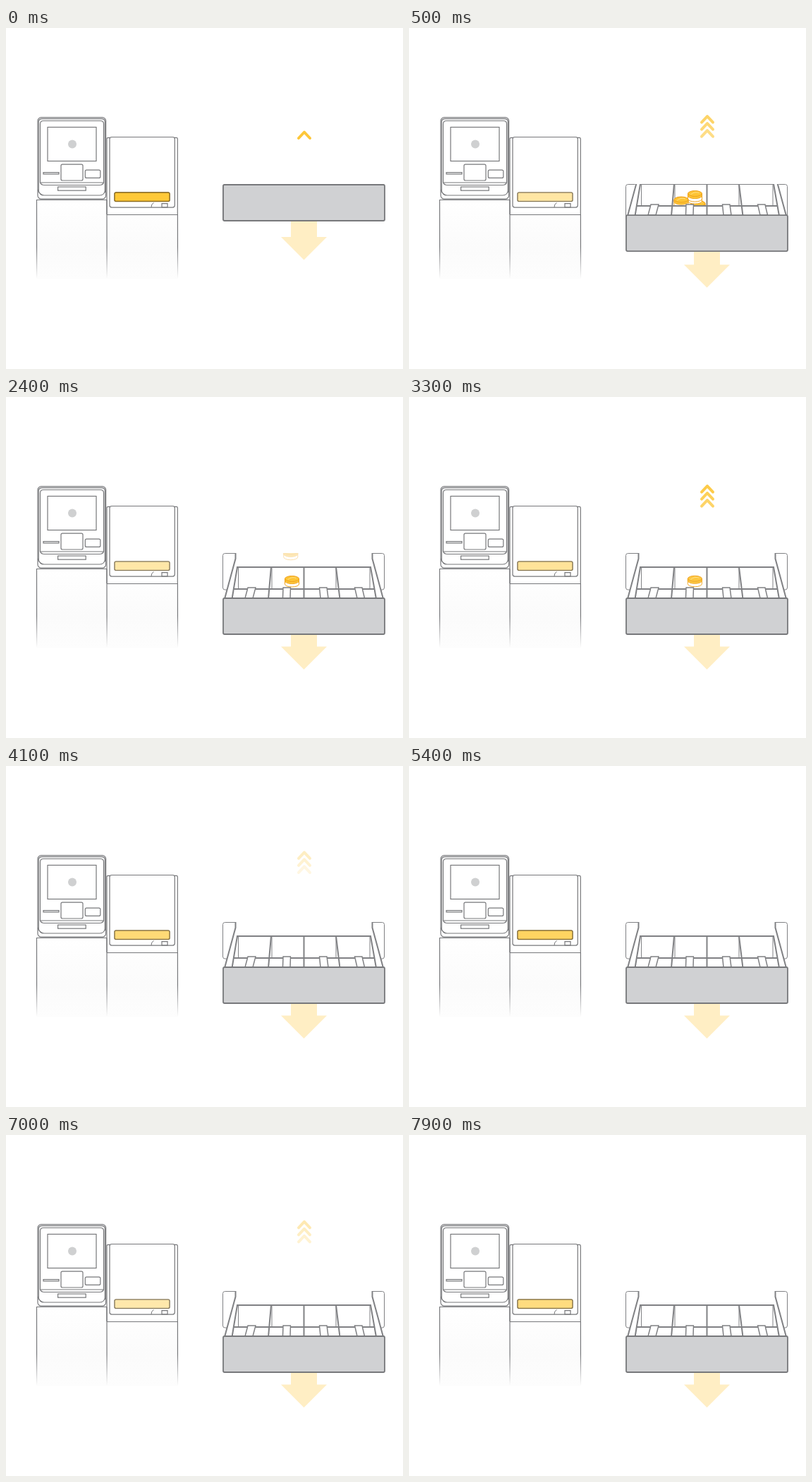
These frames come from a looping animation (563 px wide and 483 px high, 8000 ms). An HTML page:

```html
<!DOCTYPE html>
<html lang="en">
<head>
<meta charset="utf-8">
<title>Emptying the coin tray</title>
<style>
  html, body { margin: 0; width: 100%; height: 100%; overflow: hidden; background: #fff; }
  svg { display: block; width: 563px; height: 483px; }
  .line { fill: none; stroke: #77787b; stroke-width: 1.2; }
  .thick { fill: none; stroke: #808184; stroke-width: 2; }
  .thin { fill: none; stroke: #808184; stroke-width: 1; }
  .white { fill: #fff; }
  .chevron { fill: none; stroke: #fdc73a; stroke-width: 4; stroke-linecap: round; stroke-linejoin: round; }
</style>
</head>
<body>
<svg viewBox="0 0 563 483">
  <defs>
    <linearGradient id="fadeLine" gradientUnits="userSpaceOnUse" x1="0" y1="243" x2="0" y2="355">
      <stop offset="0" stop-color="#77787b"/>
      <stop offset=".6" stop-color="#77787b"/>
      <stop offset="1" stop-color="#77787b" stop-opacity="0"/>
    </linearGradient>
    <linearGradient id="fadeFill" x1="0" y1="0" x2="0" y2="1">
      <stop offset="0" stop-color="#fff"/>
      <stop offset=".6" stop-color="#fbfbfb"/>
      <stop offset="1" stop-color="#fdfdfd"/>
    </linearGradient>
    <clipPath id="opening"><rect x="300" y="221" width="245" height="130"/></clipPath>
    <clipPath id="bin"><rect x="374" y="150" width="48" height="121"/></clipPath>
    <g id="coin">
      <path d="M-10 0V7.5A10 4 0 0 0 10 7.5V0Z" fill="#fff" stroke="#f0a41c"/>
      <path d="M-10 1V3A10 4 0 0 0 10 3V1" fill="#fdc73a" stroke="#f0a41c"/>
      <ellipse rx="10" ry="4" fill="#fdc435" stroke="#ee9f1b"/>
      <path d="M-6 1.2Q0 -3.5 6 -1" fill="none" stroke="#ffdf86"/>
    </g>
  </defs>

  <!-- cabinets -->
  <rect x="43.5" y="243.5" width="200" height="112" fill="url(#fadeFill)"/>
  <rect x="144" y="244" width="100" height="20" class="white"/>
  <g fill="none" stroke="url(#fadeLine)" stroke-width="1.2">
    <path d="M43.5 243.5L43.6 355M143 243.5L143.1 355M243.4 264.5L243.5 355"/>
  </g>
  <path class="line" d="M43 243.5H143M143 264.5H244"/>

  <!-- terminal -->
  <g class="line">
    <rect x="45" y="126.6" width="96.6" height="115.6" rx="5"/>
    <path d="M46.3 233V133Q46.3 128.6 51 128.6H135.600Q140.300 128.600 140.300 133V233"/>
    <path d="M48.500 219V136Q48.500 131.500 53 131.500H134Q138.500 131.500 138.500 136V219Q137 222.500 133 222.500H54Q50 222.500 48.500 219ZM48.500 219H138.500"/>
    <path d="M45.500 229Q47.500 237 54 237H133Q139.500 237 141.200 229"/>
    <rect x="59" y="140.500" width="69" height="48"/>
    <rect x="53" y="204.600" width="22" height="2.300"/>
    <rect x="78" y="193.200" width="31" height="22.800" rx="2"/>
    <rect x="112.300" y="201.200" width="21.500" height="11.200" rx="2"/>
    <rect x="73.600" y="225" width="39.600" height="5.200"/>
  </g>
  <circle cx="94" cy="164.500" r="6" fill="#cfd0d1"/>

  <!-- coin unit -->
  <g class="line">
    <path d="M143 264V157Q143 155.300 145 155.300H241.500Q243.300 155.300 243.300 157V264"/>
    <rect x="147" y="154.500" width="92.300" height="99.600" rx="3" class="white" style="fill:#fff"/>
    <path d="M206 254Q206 249 209.500 247.500" stroke-width="1"/>
    <path d="M221 254V248.700H229V254Z"/>
    <rect x="154" y="233" width="78" height="12.500" rx="2"/>
  </g>
  <rect id="glow" x="154" y="233" width="78" height="12.500" rx="2" fill="#ffc938" stroke="#8a6a1c" stroke-width="1.300"/>

  <!-- drawer -->
  <rect class="thin" x="307.500" y="221.500" width="229" height="51.500" rx="3"/>
  <path id="arrow" d="M404 325H441V353.500H455L422.500 386L390 353.500H404Z" fill="#ffeec4"/>
  <g clip-path="url(#opening)">
    <g id="tray">
      <path class="white" d="M325.500 221L310 286H535L519.500 221Z"/>
      <path class="thin" d="M329.500 241V272M377 241V272M468 241V272M516 241V272"/>
      <g id="coins" clip-path="url(#bin)"></g>
      <path class="thick" d="M325.500 221V229L310 286M519.500 221V229L535 286M320.500 286L328 241H517L525 286M376 241L372 286M422.500 241V286M468 241L473.500 286M322 272H523"/>
      <g class="thick" style="fill:#fff;stroke-width:1.500">
        <path d="M343 270H354L350 285H339ZM393 270H403.500L403 285H392.500ZM444.500 270H455L457 285H446ZM494.500 270H505L508.500 285H498Z"/>
      </g>
    </g>
  </g>
  <rect id="panel" x="308" y="285" width="229" height="51" rx="2" fill="#d0d1d3" stroke="#77787b" stroke-width="1.800"/>
  <g id="lip" stroke="#77787b" stroke-width="2">
    <path d="M339 222H350M392 222H403M446 222H457M498 222H509"/>
  </g>

  <g id="chevrons"></g>
</svg>
<script>
const LOOP = 8000, STEP = 100;
const OPEN_MS = 800, PULSE = 1883, CLIMB = 3000;
const NS = 'http://www.w3.org/2000/svg';
const $ = id => document.getElementById(id);
const clamp = v => Math.min(1, Math.max(0, v));
const shift = (el, x, y) => el.setAttribute('transform', `translate(${x} ${y})`);

function add(parent, tag, attrs) {
  const el = document.createElementNS(NS, tag);
  for (const k in attrs) el.setAttribute(k, attrs[k]);
  return parent.appendChild(el);
}

// x, y, time of leaving; painted back to front
const coins = [
  [410, 268.5, 1000],
  [405.5, 257.5, 3250],
  [405.5, 254.5, 1800],
  [386, 263, 1000]
].map(([x, y, start]) => ({ x, y, start, el: add($('coins'), 'use', { href: '#coin' }) }));

const chevrons = [0, 1, 2].map(() =>
  add($('chevrons'), 'path', { class: 'chevron', d: 'M415 156L423 147.500L431 156' }));

function drawBar(t) {
  const d = Math.abs(t / PULSE - Math.round(t / PULSE)) * 2;
  const wave = 0.5 + 0.5 * Math.cos(Math.PI * d);
  $('glow').style.opacity = (wave + 1 - d) / 2;
}

function drawDrawer(t) {
  const u = clamp(t / OPEN_MS);
  const left = 1 - u * u * (3 - 2 * u);
  shift($('tray'), 0, -63 * left);
  shift($('panel'), 0, -63 * left);
  shift($('arrow'), 0, -57.5 * left);
  $('lip').style.opacity = u > 0 ? 0 : 1;
}

function drawCoins(t) {
  for (const c of coins) {
    const u = clamp((t - c.start) / 700);
    shift(c.el, c.x - 2 * u, c.y - 48 * u * u);
    c.el.style.opacity = u < 1 ? 1 - 0.75 * u : 0;
  }
}

function drawChevrons(t) {
  const phase = t % CLIMB;
  chevrons.forEach((el, i) => {
    const u = (phase - i * 100) / 1300;
    shift(el, 0, -10.5 * i - 6 * clamp(u));
    el.style.opacity = u < 0 ? 0 : 1 - clamp(u);
  });
}

function draw(ms) {
  const t = Math.floor((ms % LOOP) / STEP) * STEP;
  drawBar(t);
  drawDrawer(t);
  drawCoins(t);
  drawChevrons(t);
}

const begin = performance.now();
function tick() {
  draw(performance.now() - begin);
  requestAnimationFrame(tick);
}
tick();
</script>
</body>
</html>
```
